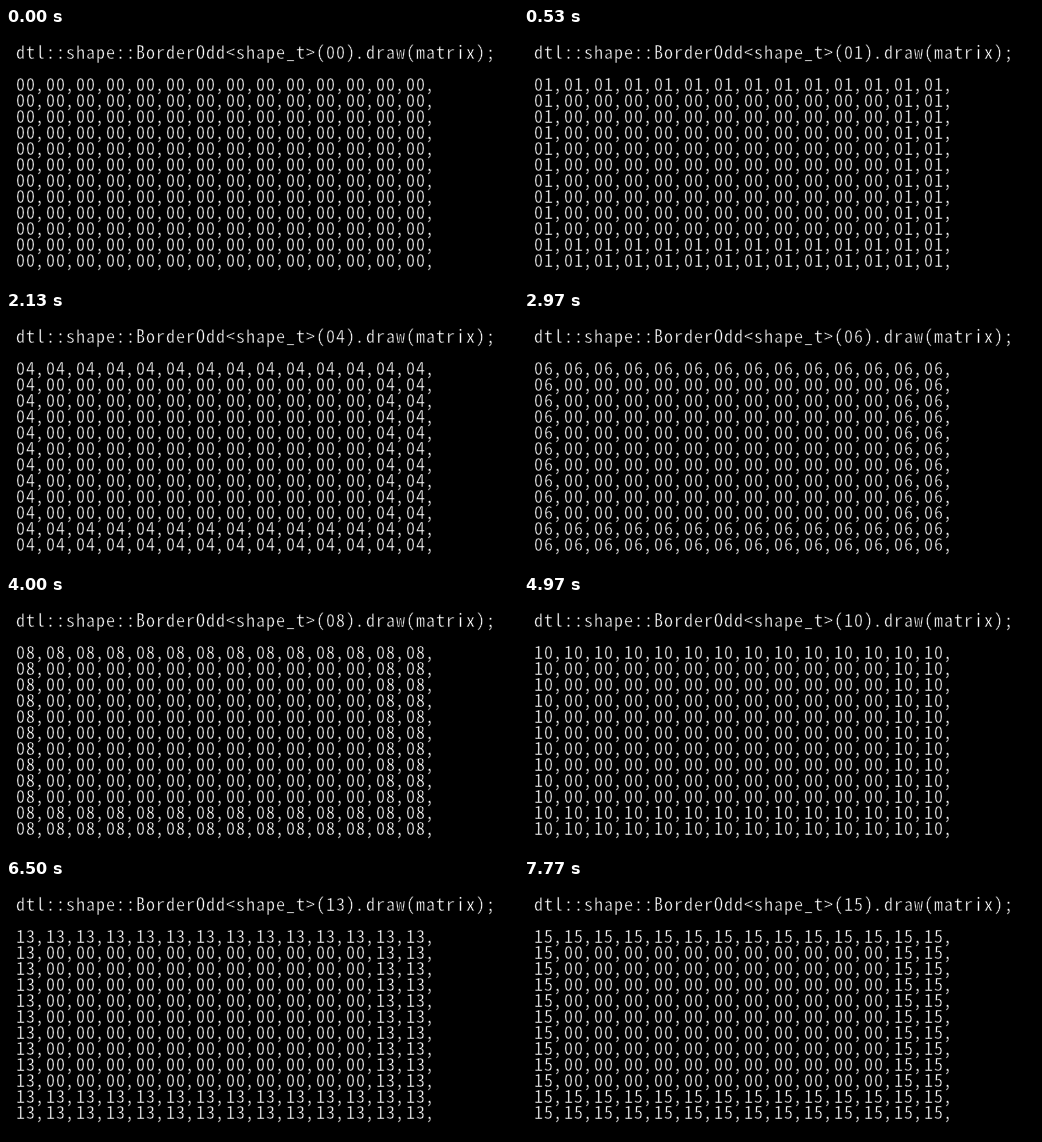
Write an HTML page with a canvas that moves like this. It is 512 px wide and 256 px high and loops after 8000 ms.

```html
<!DOCTYPE html>
<html lang="en">
<head>
<meta charset="utf-8">
<title>BorderOdd</title>
<style>
  html, body { margin: 0; width: 100%; height: 100%; overflow: hidden; background: #000; }
  canvas { display: block; }
</style>
</head>
<body>
<canvas id="stage" width="512" height="256"></canvas>
<script>
const ctx = document.getElementById('stage').getContext('2d');
const LOOP = 8000;
const COLS = 14, ROWS = 12;
const LEFT = 10, ADVANCE = 10, LINE = 16;
const TITLE_BASE = 31, GRID_BASE = 63;

// Start time of each border value, from 0 upward
const STARTS = [0, 530, 1030, 1530, 2000, 2470, 2970, 3500,
                4000, 4500, 4970, 5470, 5970, 6500, 7000, 7500];

const pad = n => String(n).padStart(2, '0');

// Half-width type: every character sits in its own 10px cell.
// A fine black outline thins the strokes to about one pixel.
function drawLine(text, baseline) {
  [...text].forEach((char, i) => {
    const center = /[,.]/.test(char) ? 3.5 : 4.5;
    const x = LEFT + i * ADVANCE + center;
    ctx.fillText(char, x, baseline);
    ctx.strokeText(char, x, baseline);
  });
}

// The border is one cell thick at the top and left, two at the bottom and right
function isBorder(col, row) {
  return col < 1 || row < 1 || col >= COLS - 2 || row >= ROWS - 2;
}

function draw(value) {
  ctx.clearRect(0, 0, 512, 256);
  drawLine(`dtl::shape::BorderOdd<shape_t>(${pad(value)}).draw(matrix);`, TITLE_BASE);
  for (let row = 0; row < ROWS; row++) {
    let line = '';
    for (let col = 0; col < COLS; col++) {
      line += pad(isBorder(col, row) ? value : 0) + ',';
    }
    drawLine(line, GRID_BASE + row * LINE);
  }
}

ctx.font = '18px "Noto Sans Mono CJK JP", "Noto Sans Mono CJK SC", "Noto Sans CJK JP", monospace';
ctx.textAlign = 'center';
ctx.fillStyle = '#fff';
ctx.strokeStyle = '#000';
ctx.lineWidth = 0.4;
ctx.lineJoin = 'round';

const origin = performance.now();
let shown = -1;

function tick() {
  const time = (performance.now() - origin) % LOOP;
  const value = STARTS.filter(start => start <= time).length - 1;
  if (value !== shown) draw(shown = value);
  requestAnimationFrame(tick);
}
tick();
</script>
</body>
</html>
```
